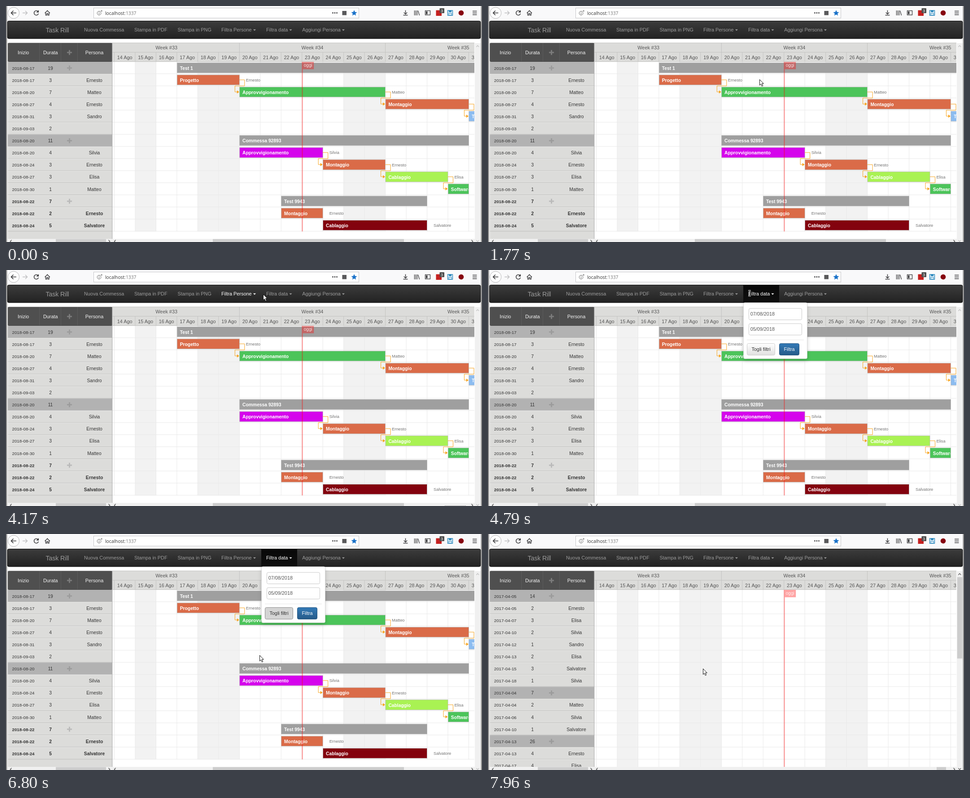
Animation, 1061 px wide and 528 px high, one loop 8 s. Source, as an HTML page:

```html
<!DOCTYPE html>
<html lang="it">
<head>
<meta charset="utf-8">
<style>
html, body { margin: 0; width: 100%; height: 100%; overflow: hidden; background: #fff; }
svg { display: block; width: 1061px; height: 528px; }
text { font-family: "Liberation Sans", Arial, sans-serif; font-size: 10.85px; fill: #333; white-space: pre; }
.mid { text-anchor: middle; }
.bold { font-weight: bold; }
.url { font-family: "Open Sans", "Noto Sans", sans-serif; font-size: 10.3px; }
.date { font-size: 9.8px; }
.cell { font-size: 10.3px; }
.side { font-size: 9.3px; fill: #737373; }
.today { font-size: 10px; fill: #fff; }
.head { fill: #f4f4f4; }
.scale { fill: #555; }
.brand { font-size: 13.95px; fill: #9d9d9d; }
.bar { font-size: 10.3px; font-weight: bold; fill: #fff; }
.nav text { fill: #9d9d9d; }
.nav path { fill: #9d9d9d; }
.nav.hot text, .nav.hot path { fill: #fff; }
</style>
</head>
<body>
<svg id="stage" viewBox="0 0 1061 528" xmlns="http://www.w3.org/2000/svg"></svg>
<script>
const LOOP = 8000, TOP = 125, ROW = 27.1, DAY = 46.47, BOTTOM = 521;
const dayX = d => 520.3 + DAY * (d - 20);
const rowY = i => TOP + ROW * i;

const rect = (x, y, w, h, fill, more = '') =>
  `<rect x="${x}" y="${y}" width="${w}" height="${h}" fill="${fill}" ${more}/>`;
const text = (x, y, s, cls = '', more = '') => `<text x="${x}" y="${y}" class="${cls}" ${more}>${s}</text>`;
const line = (d, stroke, width = 1, more = '') =>
  `<path d="${d}" fill="none" stroke="${stroke}" stroke-width="${width}" ${more}/>`;
const shape = (d, fill, more = '') => `<path d="${d}" fill="${fill}" ${more}/>`;
const group = (id, body, more = '') => `<g id="${id}" ${more}>${body}</g>`;
const range = (a, b) => Array.from({ length: b - a + 1 }, (_, i) => a + i);
const plus = (x, y, fill) => rect(x - 5.5, y - 1.5, 11, 3, fill) + rect(x - 1.5, y - 5.5, 3, 11, fill);

const gradient = (id, a, b) =>
  `<linearGradient id="${id}" x2="0" y2="1"><stop stop-color="${a}"/><stop offset="1" stop-color="${b}"/></linearGradient>`;
const clip = (id, x, y, w, h) => `<clipPath id="${id}">${rect(x, y, w, h, '#000')}</clipPath>`;

const defs = `<defs>
  ${gradient('navFill', '#3c3c3c', '#222')}
  ${gradient('openFill', '#080808', '#0f0f0f')}
  ${gradient('plain', '#fff', '#e0e0e0')}
  ${gradient('focus', '#f0f0f0', '#e0e0e0')}
  ${gradient('primary', '#337ab7', '#265a88')}
  ${clip('chart', 237, 82, 807, BOTTOM - 82)}
  ${clip('grid', 4, 82, 233, BOTTOM - 82)}
  <filter id="shadow" x="-10%" y="-10%" width="120%" height="125%">
    <feDropShadow dx="0" dy="4" stdDeviation="4" flood-opacity=".18"/></filter>
</defs>`;

function browserBar() {
  const ink = '#3b3b3d';
  return rect(0, 0, 1061, 32, '#f9f9fa')
    + `<circle cx="17" cy="15.5" r="12.5" fill="#fff" stroke="#b4b4b6"/>`
    + line('M23 15.5H12M16.5 10.5L11.5 15.5L16.5 20.5', ink, 1.7)
    + line('M37 15.5H47M43 11L47.5 15.5L43 20', '#bdbdbf', 1.4)
    + line('M71.5 12.5A5 5 0 1 0 72.3 17', ink, 1.6) + shape('M73 9V14.5H67.5Z', ink)
    + line('M86.5 16L92.2 10.3L98 16M88.5 15V20.5H91V17H93.5V20.5H96V15', ink, 1.4)
    + rect(195.5, 4.5, 591, 22.5, '#fff', 'stroke="#c6c6c8"')
    + `<circle cx="207.5" cy="16" r="4.3" fill="none" stroke="#666"/>`
    + line('M207.5 15V18.5M207.5 13V14', '#666', 1.1) + line('M211 11H215M213 9.5V12.5', '#666', 1)
    + text(221, 19.5, 'localhost<tspan fill="#777">:1337</tspan>', 'url')
    + [728.5, 733, 737.5].map(x => `<circle cx="${x}" cy="15.5" r="1.4" fill="${ink}"/>`).join('')
    + rect(749.5, 11, 9.5, 9.5, '#59595b')
    + shape('M776 9L777.9 13.5L782.5 13.9L779 17L780.1 21.6L776 19.1L771.9 21.6L773 17L769.5 13.9L774.1 13.5Z', '#1a72c9')
    + line('M890.5 9.5V18M886.8 14.5L890.5 18.2L894.2 14.5M885.5 20.5H895.5', ink, 1.5)
    + line('M910.5 10V21M913.5 10V21M916.5 10V21M918.5 10.5L921.5 21', ink, 1.3)
    + rect(934.5, 10.5, 11, 9.5, 'none', `stroke="${ink}" stroke-width="1.3"`)
    + rect(936, 12, 3.5, 6.5, ink)
    + rect(958.5, 9.5, 12.5, 12.5, '#c5201f')
    + rect(966.5, 5, 10.5, 11, '#4d4d4d', 'rx="1"')
    + text(971.7, 13.6, '3', 'mid', 'style="font-size:8.5px;fill:#fff"')
    + rect(984.5, 10, 11, 11, '#eef6fb', 'stroke="#1b7fb8" stroke-width="1.3"')
    + rect(987, 10, 6, 3.5, '#1b7fb8') + rect(987, 16, 6, 4.5, 'none', 'stroke="#1b7fb8"')
    + `<circle cx="1014.5" cy="15.5" r="5.8" fill="#86000f"/>`
    + line('M1040 11.5H1049.5M1040 15.5H1049.5M1040 19.5H1049.5', ink, 1.4);
}

function navBar() {
  const items = [
    [174, 'Nuova Commessa'], [286, 'Stampa in PDF'], [382.5, 'Stampa in PNG'],
    [480, 'Filtra Persone', 551], [580, 'Filtra data', 631.5], [660.3, 'Aggiungi Persona', 749]];
  return rect(3.3, 33.5, 1054.4, 39.5, 'url(#navFill)', 'rx="3" stroke="#080808"')
    + group('openTab', rect(569, 34, 80, 39, 'url(#openFill)'))
    + text(88.5, 59, 'Task Rill', 'brand')
    + items.map(([x, s, caret], i) => group('nav' + i,
        text(x, 57.3, s) + (caret ? shape(`M${caret} 52.3h6l-3 3.2z`, '') : ''), 'class="nav"')).join('');
}

// Each row: date, duration, person ('' for none), style: g = group, b = bold, p = bold with plus
const planned = [
  ['2018-08-17', 19, '', 'g'], ['2018-08-17', 3, 'Ernesto'], ['2018-08-20', 7, 'Matteo'],
  ['2018-08-27', 4, 'Ernesto'], ['2018-08-31', 3, 'Sandro'], ['2018-09-03', 2, ''],
  ['2018-08-20', 11, '', 'g'], ['2018-08-20', 4, 'Silvia'], ['2018-08-24', 3, 'Ernesto'],
  ['2018-08-27', 3, 'Elisa'], ['2018-08-30', 1, 'Matteo'], ['2018-08-22', 7, '', 'p'],
  ['2018-08-22', 2, 'Ernesto', 'b'], ['2018-08-24', 5, 'Salvatore', 'b']];
const unfiltered = [
  ['2017-04-05', 14, '', 'g'], ['2017-04-05', 2, 'Ernesto'], ['2017-04-07', 3, 'Elisa'],
  ['2017-04-10', 2, 'Silvia'], ['2017-04-12', 1, 'Sandro'], ['2017-04-13', 2, 'Elisa'],
  ['2017-04-15', 3, 'Salvatore'], ['2017-04-18', 1, 'Silvia'], ['2017-04-04', 7, '', 'g'],
  ['2017-04-04', 2, 'Matteo'], ['2017-04-06', 4, 'Silvia'], ['2017-04-10', 1, 'Salvatore'],
  ['2017-04-13', 26, '', 'g'], ['2017-04-13', 4, 'Ernesto'], ['2017-04-17', 4, 'Elisa']];

function table(rows) {
  return rows.map(([date, days, who, style = ''], i) => {
    const y = rowY(i), base = y + 17.5, bold = style === 'b' || style === 'p' ? ' bold' : '';
    return rect(4, y, 233, ROW, style === 'g' ? '#b2b2b2' : '#dcdcda')
      + rect(4, y, 233, 1, style === 'g' ? '#bcbcbc' : '#e8e8e6')
      + rect(4, y + ROW - 1, 233, 1, '#bdbdbb')
      + text(38.5, base, date, 'mid date' + bold) + text(99, base, days, 'mid cell' + bold)
      + text(197, base, who, 'mid cell' + bold)
      + (style === 'g' || style === 'p' ? plus(141.5, y + 13.7, style === 'g' ? '#9c9c9c' : '#bbb') : '');
  }).join('');
}

function gridHead() {
  return rect(4, 82.5, 233, 42.5, '#4f4f4f', 'rx="2"')
    + [74, 122, 159].map(x => rect(x, 83, 1, 41, '#5c5c5c')).join('')
    + text(38.7, 107.5, 'Inizio', 'mid head') + text(99.2, 107.5, 'Durata', 'mid head')
    + text(197, 107.5, 'Persona', 'mid head') + plus(141.5, 104, '#7b7b7b');
}

function chartHead() {
  return rect(237, 82, 807, 43, '#dcdcda')
    + line('M237 82.5H1044M237 103.5H1044M237 124.5H1044', '#c4c4c2')
    + [33, 34, 35].map(w => {
        const x = dayX(13 + 7 * (w - 33));
        return line(`M${x} 82V103`, '#c4c4c2') + text(x + DAY * 3.5, 96.8, 'Week #' + w, 'mid scale');
      }).join('')
    + range(13, 31).map(d => line(`M${dayX(d)} 103V125`, '#c4c4c2')
        + text(dayX(d + .5), 118.5, d + ' Ago', 'mid scale')).join('');
}

function cells(rows, end) {
  return [15, 18, 19, 25, 26].map(d => rect(dayX(d), TOP, DAY, end - TOP, '#f2f2f2')).join('')
    + range(14, 31).map(d => line(`M${dayX(d)} ${TOP}V${end}`, '#e9e9e9')).join('')
    + range(1, rows).map(i => line(`M237 ${rowY(i) - .5}H1044`, '#e9e9e9')).join('');
}

const GRAY = '#9f9f9f', ORANGE = '#da6b48', GREEN = '#4cc45a';
// Each bar: row, first day, end day, colour, label, person
const bars = [
  [0, 17, 36, GRAY, 'Test 1'], [1, 17, 20, ORANGE, 'Progetto', 'Ernesto'],
  [2, 20, 27, GREEN, 'Approvvigionamento', 'Matteo'], [3, 27, 31, ORANGE, 'Montaggio', 'Ernesto'],
  [4, 31, 34, '#8cbcf0', 'Test'], [6, 20, 31, GRAY, 'Commessa 92893'],
  [7, 20, 24, '#d504ec', 'Approvvigionamento', 'Silvia'], [8, 24, 27, ORANGE, 'Montaggio', 'Ernesto'],
  [9, 27, 30, '#a9f253', 'Cablaggio', 'Elisa'], [10, 30, 31, GREEN, 'Software', ''],
  [11, 22, 29, GRAY, 'Test 9943'], [12, 22, 24, ORANGE, 'Montaggio', 'Ernesto'],
  [13, 24, 29, '#83020e', 'Cablaggio', 'Salvatore']];

function link(row, day) {
  const x = dayX(day), y = rowY(row) + 13.6;
  return line(`M${x} ${y - .5}h11.5v13.6h-21.5v13.4h6`, '#f7a31c')
    + shape(`M${x - 5.5} ${y + 23}l5 3.5l-5 3.5z`, '#f7a31c');
}

function chartBars() {
  return bars.map(([row, from, to, fill, label, who], i) => {
    const x = dayX(from), y = rowY(row) + 1.6, w = (to - from) * DAY;
    return clip('bar' + i, x, y, w - 1, 23)
      + rect(x + .4, y + .4, w - .4, 22.5, fill, 'stroke="#b9b9b9" stroke-width=".8"')
      + text(x + 6.8, y + 16, label, 'bar', `clip-path="url(#bar${i})"`)
      + (who ? text(x + w + 14.5, y + 15.1, who, 'side') : '');
  }).join('')
    + [[1, 20], [2, 27], [3, 31], [7, 24], [8, 27], [9, 30]].map(l => link(...l)).join('');
}

const today = end => rect(659.5, TOP, 2, end - TOP, '#f00', 'opacity=".43"')
  + `<g opacity=".36">${rect(661.5, TOP, 24.7, 16.5, '#f00')}</g>`
  + text(663.8, 136.3, 'oggi', 'today', 'opacity=".8"');

const chevron = (x, y, dx, dy, c) => dx
  ? line(`M${x + dx} ${y - 3}L${x - dx} ${y}L${x + dx} ${y + 3}`, c, 1.3)
  : line(`M${x - 3} ${y + dy}L${x} ${y - dy}L${x + 3} ${y + dy}`, c, 1.3);

function scrollBars(thumbX, thumbW, tall) {
  const dark = '#505050';
  return rect(4, BOTTOM, 1054, 7, '#f0f0f0') + rect(1045, 83, 13, 445, '#f0f0f0')
    + rect(111, BOTTOM + .5, 112, 7, '#cdcdcd') + rect(thumbX, BOTTOM + .5, thumbW, 7, '#cdcdcd')
    + [[11, 1.6], [230, -1.6], [243, 1.6], [1039, -1.6]].map(([x, d]) => chevron(x, 526.5, d, 0, dark)).join('')
    + chevron(1051.3, 90, 0, 1.6, tall ? dark : '#bfbfbf')
    + chevron(1051.3, 525.5, 0, -1.6, tall ? dark : '#bfbfbf')
    + (tall ? rect(1045.8, 96.5, 11.4, 182, '#cdcdcd') : '');
}

function view(id, rows, body, end, thumbX, thumbW, tall) {
  return group(id,
    `<g clip-path="url(#grid)">${rect(4, TOP, 233, 396, '#dcdcda')}${table(rows)}</g>`
    + `<g clip-path="url(#chart)">${cells(rows.length, end)}${body}${today(end)}</g>`
    + scrollBars(thumbX, thumbW, tall));
}

function dropdown() {
  const field = (y, s) => rect(581.5, y, 118, 25.5, '#fff', 'rx="3" stroke="#c8c8c8"')
    + text(584.7, y + 16.4, s, '', 'style="fill:#555"');
  return group('menu',
    rect(569.5, 73, 142, 125.5, '#fff', 'rx="3" stroke="#ccc" stroke-width=".7" filter="url(#shadow)"')
    + field(86, '07/08/2018') + field(120, '05/09/2018')
    + rect(577, 156, 127, 1, '#e5e5e5')
    + rect(577.5, 164.5, 62, 26, 'url(#plain)', 'id="clear" rx="3" stroke="#ccc"')
    + text(608.5, 181.3, 'Togli filtri', 'mid')
    + rect(649.5, 164.5, 44, 26, 'url(#primary)', 'rx="3" stroke="#245580"')
    + text(671.5, 181.3, 'Filtra', 'mid', 'style="fill:#fff"'));
}

const cursor = group('arrow', shape('M.5 .5V13.2L3.4 10.5L5.4 15.4L7.6 14.5L5.6 9.7H9.3Z', '#fff', 'stroke="#111" stroke-width="1"'))
  + group('beam', line('M-2.5 -6H2.5M0 -6V6M-2.5 6H2.5', '#fff', 2.4) + line('M-2 -6H2M0 -6V6M-2 6H2', '#111', 1));

const stage = document.getElementById('stage');
stage.innerHTML = defs + rect(0, 0, 1061, 528, '#fff') + browserBar()
  + view('before', planned, chartBars(), rowY(14), 461, 426, false)
  + view('after', unfiltered, '', BOTTOM, 1000, 21, true)
  + gridHead() + `<g clip-path="url(#chart)">${chartHead()}</g>`
  + rect(236.3, 82, 1, 439, '#a9a9a9')
  + navBar() + dropdown()
  + rect(1, 0, 1, 528, '#111') + rect(1059, 0, 1, 528, '#111')
  + line('M978 527.5H1059', '#999', 1, 'id="hint" stroke-dasharray="2 1"') + cursor;

const $ = id => document.getElementById(id);
const show = (id, on) => $(id).setAttribute('visibility', on ? 'visible' : 'hidden');

// Pointer holds each place until the next: time, x, y
const moves = [
  [380, 943, 425], [450, 599, 240], [680, 851, 230], [760, 506, 200], [840, 666, 173],
  [1060, 645, 140], [1150, 622, 95], [1230, 604, 56], [1310, 596, 33],
  [1620, 440, 70], [1690, 366, 110], [1770, 605, 164],
  [2080, 598, 205], [2160, 582, 255], [2240, 570, 284],
  [3790, 566, 255], [3870, 560, 200], [3950, 552, 145], [4020, 545, 95], [4100, 546, 60],
  [4170, 573, 54], [4250, 583, 52],
  [5020, 588, 76], [5100, 594, 105], [5170, 600, 134], [5250, 606, 162], [5320, 612, 185],
  [6640, 600, 205], [6720, 580, 248], [6800, 565, 271],
  [7330, 538, 280], [7430, 502, 293], [7530, 479, 301]];

function buttonLook(t) {
  if (t < 5250 || t >= 7730) return ['url(#plain)', '#ccc'];
  if (t < 5630) return ['#e0e0e0', '#bbb'];
  if (t < 6870) return ['#d4d4d4', '#8c8c8c'];
  return ['url(#focus)', '#8c8c8c'];
}

function draw(t) {
  const open = t >= 4790 && t < 7960, done = t >= 6870;
  show('before', !done);
  show('after', done);
  show('menu', open);
  show('openTab', open);
  $('nav3').classList.toggle('hot', t >= 4100 && t < 4250);
  $('nav4').classList.toggle('hot', open || (t >= 1230 && t < 1620) || (t >= 4250 && t < 4790));
  const [fill, stroke] = buttonLook(t);
  $('clear').setAttribute('fill', fill);
  $('clear').setAttribute('stroke', stroke);
  show('hint', t >= 2620 && t < 4640);
  $('hint').setAttribute('d', `M978 527.5H${t < 3790 ? 1059 : 1025}`);

  const at = moves.filter(m => m[0] <= t).pop();
  const beam = t >= 4250 && t < 5020;
  show('arrow', at && !beam);
  show('beam', beam);
  if (at) $(beam ? 'beam' : 'arrow').setAttribute('transform', `translate(${at[1]} ${at[2]})`);
}

function tick() {
  draw(performance.now() % LOOP);
  requestAnimationFrame(tick);
}
tick();
</script>
</body>
</html>
```
